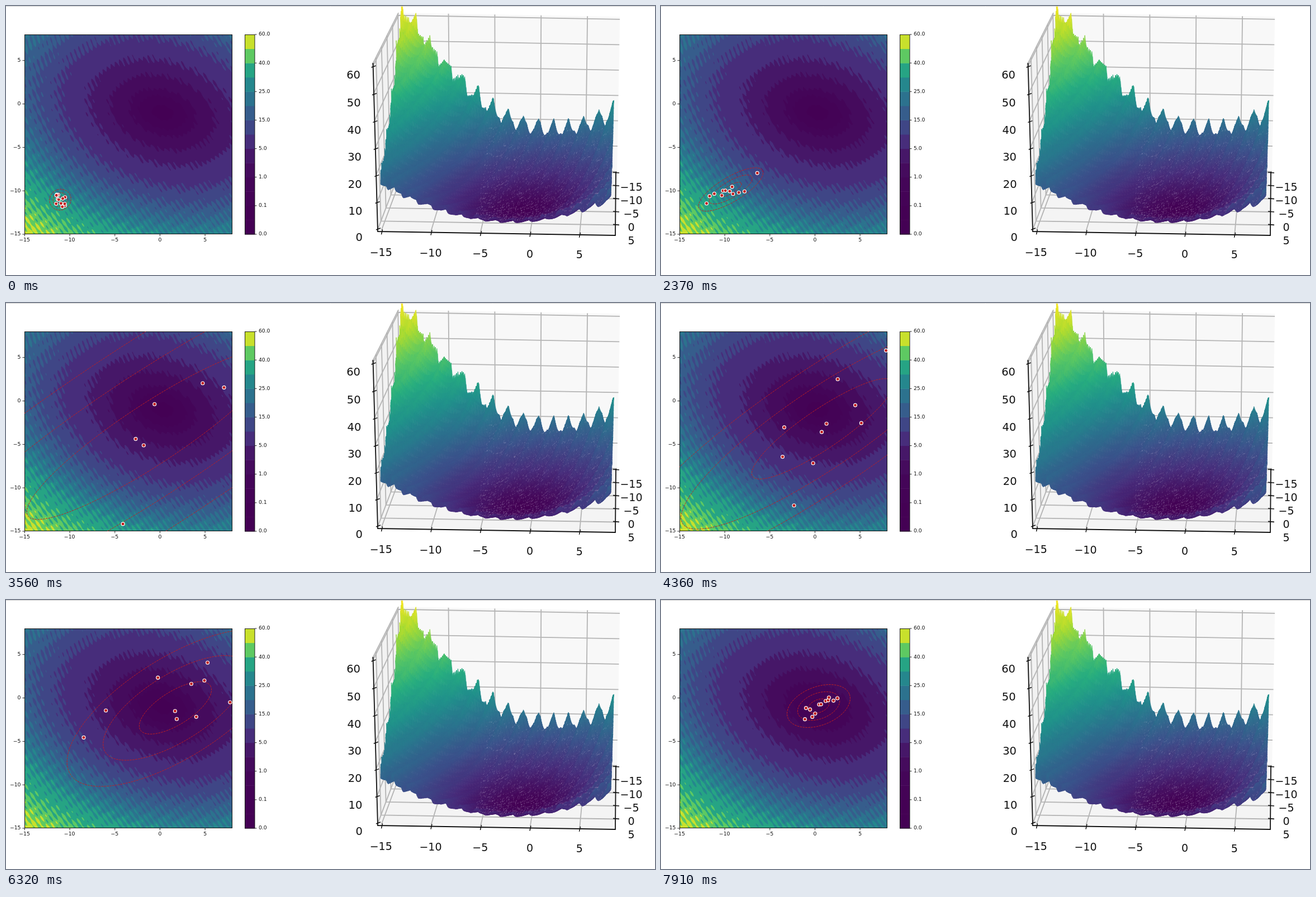
Recreate the animation shown at these times as an HTML page with a canvas. Size 1161 px wide and 482 px high, loop 8000 ms.

```html
<!DOCTYPE html>
<html>
<head>
<meta charset="utf-8">
<style>
html, body { margin: 0; width: 100%; height: 100%; overflow: hidden; background: #fff; }
canvas { display: block; }
</style>
</head>
<body>
<canvas id="stage" width="1161" height="482"></canvas>
<script>
const W = 1161, H = 482, TAU = Math.PI * 2, LOOP = 8000, STEP = 395.5;
const BOX = { x: 33, y: 51, w: 372, h: 358 };
const LEVELS = [0, .05, .1, .5, 1, 2.5, 5, 10, 15, 20, 25, 30, 40, 50, 60];
const FONT = 'px "DejaVu Sans", sans-serif';
const INK = '#111';

const VIRIDIS = ['440154', '472d7b', '3b528b', '2c728e', '21918c', '28ae80', '5ec962', 'addc30', 'fde725']
  .map(h => [0, 2, 4].map(i => parseInt(h.slice(i, i + 2), 16)));
const lerp = (a, b, t) => a + (b - a) * t;
const clamp = (v, lo, hi) => Math.max(lo, Math.min(hi, v));

function viridis(v) {
  const p = clamp(v, 0, 1) * 8, i = Math.min(7, Math.floor(p));
  return VIRIDIS[i].map((c, k) => lerp(c, VIRIDIS[i + 1][k], p - i));
}
const css = c => `rgb(${c.map(Math.round).join()})`;
const BANDS = LEVELS.slice(1).map((v, i) => viridis((v + LEVELS[i]) / 120));

function rng(seed) {
  return () => {
    seed = (seed + 0x6D2B79F5) | 0;
    let t = Math.imul(seed ^ (seed >>> 15), 1 | seed);
    t = (t + Math.imul(t ^ (t >>> 7), 61 | t)) ^ t;
    return ((t ^ (t >>> 14)) >>> 0) / 4294967296;
  };
}

// The plots never change, so they are drawn once
const base = document.createElement('canvas');
base.width = W;
base.height = H;
const g = base.getContext('2d');

function path(points) {
  g.beginPath();
  points.forEach(([x, y], i) => i ? g.lineTo(x, y) : g.moveTo(x, y));
}
function line(points, color, width) {
  path(points);
  g.strokeStyle = color;
  g.lineWidth = width;
  g.stroke();
}
function poly(points, color) {
  path(points);
  g.closePath();
  g.fillStyle = color;
  g.fill();
}
function label(text, x, y, size, align) {
  g.font = size + FONT;
  g.textAlign = align;
  g.textBaseline = 'middle';
  g.fillStyle = INK;
  g.fillText(String(text).replace('-', '\u2212'), x, y);
}

// Contour map
function height(px, py) {
  const dx = (px - 33) / 16.17 - 15.3, dy = 9 - (py - 51) / 15.565;
  const q = .08 * dx * dx + .14 * dy * dy + .05 * dx * dy;
  const rise = Math.max(0, 380 - py);
  const bend = .28 * (1 - (px - 33) / 372) * rise * rise / 560;
  const p1 = TAU * (px * .82 - py * .57 - bend) / 8.5;
  const p2 = TAU * (px * .57 + py * .82) / 21;
  return q * (1 + .11 * Math.cos(p1) + .06 * Math.cos(p2));
}
function band(v) {
  let i = 0;
  while (i < BANDS.length - 1 && v >= LEVELS[i + 1]) i++;
  return BANDS[i];
}
function drawMap() {
  const { x, y, w, h } = BOX;
  const img = g.createImageData(w, h);
  for (let j = 0, n = 0; j < h; j++) {
    for (let i = 0; i < w; i++, n += 4) {
      const sum = [0, 0, 0];
      for (let s = 0; s < 4; s++) {
        const c = band(height(x + i + .25 + .5 * (s & 1), y + j + .25 + .5 * (s >> 1)));
        c.forEach((v, k) => sum[k] += v / 4);
      }
      img.data.set([...sum, 255], n);
    }
  }
  g.putImageData(img, x, y);
  g.strokeStyle = INK;
  g.lineWidth = 1;
  g.strokeRect(x + .5, y + .5, w - 1, h - 1);
  for (let v = -15; v <= 5; v += 5) {
    const tx = x + .5 + (v + 15) * 16.13, ty = 409 - (v + 15) * 15.565;
    line([[tx, 409], [tx, 412.5]], INK, .9);
    line([[29.5, ty], [33, ty]], INK, .9);
    label(v, tx - (v < 0 ? .5 : 0), 420, 9.3, 'center');
    label(v, 26.5, ty, 9.3, 'right');
  }
}
function drawBar() {
  const step = BOX.h / BANDS.length;
  BANDS.forEach((c, i) => {
    g.fillStyle = css(c);
    g.fillRect(427, 409 - (i + 1) * step, 18, step + .5);
  });
  g.strokeStyle = INK;
  g.lineWidth = .9;
  g.strokeRect(427.5, 51.5, 17.5, 357.5);
  for (let i = 0; i < LEVELS.length; i += 2) {
    const y = 409 - i * step;
    line([[445, y], [448.5, y]], INK, .9);
    label(LEVELS[i].toFixed(1), 452, y, 9.2, 'left');
  }
}

// Perspective view of the surface
function project(x, y, z) {
  const t = (y + 15) / 23;
  return [
    lerp(955.5 + 16.18 * x, 938 + 17.7 * x, t) + z * lerp(.007, .013, t) * (x + 3.5),
    369 + 4.7 * y - .3 * (8.5 - x) - z * lerp(4.55, 4.85, t)
  ];
}
function surface(x, y) {
  const t = (y + 15) / 23, s = t - .65;
  const floor = s < 0 ? 17 * (s / .65) ** 2 : 4 * (s / .35) ** 2;
  const q = floor + (.165 - .073 * t ** 3) * (x - lerp(1.4, -2.4, t)) ** 2;
  const left = clamp((-4 - x) / 5, 0, 1);
  const cone = u => 1 - 1.8 * Math.abs(Math.sin(Math.PI * u));
  const broad = cone((x + .3 * (y + 15) - 3.1) / 1.65);
  const fine = cone((x + .7 * y) / .75);
  return q * (1 + lerp(.2, .08, left) * broad + lerp(.03, .11, left) * fine) + .25 * fine;
}
function drawPanes() {
  const x0 = -15.4, x1 = 8.5, y0 = -15.4, y1 = 8.4, top = 61;
  const grid = (...ps) => line(ps.map(p => project(...p)), '#b4b4b4', 1.8);
  const quad = (color, ...ps) => poly(ps.map(p => project(...p)), color);
  quad('#f4f4f4', [x0, y0, 0], [x1, y0, 0], [x1, y1, 0], [x0, y1, 0]);
  quad('#f2f2f2', [x0, y0, 0], [x0, y0, top], [x0, y1, top], [x0, y1, 0]);
  quad('#f8f8f8', [x0, y0, 0], [x0, y0, top], [x1, y0, top], [x1, y0, 0]);
  for (let v = -15; v <= 5; v += 5) {
    grid([v, y0, top], [v, y0, 0], [v, y1, 0]);
    grid([x0, v, top], [x0, v, 0], [x1, v, 0]);
  }
  for (let z = 0; z <= 60; z += 10) grid([x0, y1, z], [x0, y0, z], [x1, y0, z]);
  grid([x0, y1, top], [x0, y0, top]);
}
function drawAxes() {
  line([[656.5, 102], [665, 404], [1090, 411], [1091, 297]], INK, 1.8);
  for (let z = 0; z <= 60; z += 10) {
    const y = 400 - 4.85 * z + z * (60 - z) * .002, x = 665 - z * .14;
    line([[x - 3, y + 1], [x + 5, y - 2]], INK, 1.5);
    label(z, 638 - z / 15, y + 16, 19.5, 'right');
  }
  for (let v = -15; v <= 5; v += 5) {
    const x = 938 + 17.7 * v, y = 408.5 + v * .28;
    line([[x + 1, y - 4], [x - 1, y + 5]], INK, 1.5);
    label(v, 937 + 17.75 * v, 446 + v * .22, 19, 'center');
    const ry = 368.5 + 4.67 * v;
    line([[1086, ry - .5], [1097, ry + .5]], INK, 1.6);
    label(v, 1118.5, 398.5 + 4.8 * v, 19, 'center');
  }
}
function drawSurface() {
  const nx = 345, ny = 120, rand = rng(7);
  const row = j => Array.from({ length: nx + 1 }, (_, i) => {
    const x = -15 + 23 * i / nx, y = -15 + 23 * j / ny, z = surface(x, y);
    return [...project(x, y, z), z];
  });
  let back = row(0);
  for (let j = 1; j <= ny; j++) {
    const front = row(j);
    for (let i = 0; i < nx; i++) {
      const cell = [back[i], back[i + 1], front[i + 1], front[i]];
      const z = cell.reduce((s, p) => s + p[2], 0) / 4;
      const color = css(viridis((Math.max(0, z) / 62) ** .87));
      poly(cell, color);
      g.strokeStyle = color;
      g.lineWidth = .7;
      g.stroke();
      // Pale seams between the facets of the valley
      if (i > nx * .4 && z < 22 && rand() < .1) {
        const [x, y] = front[i];
        line([[x, y], [x + 1.2, y - 2.6]], 'rgba(205,195,220,.32)', .8);
      }
    }
    back = front;
  }
}

g.fillStyle = '#fff';
g.fillRect(0, 0, W, H);
drawMap();
drawBar();
drawPanes();
drawSurface();
drawAxes();
line([[0, .5], [W, .5]], '#cfcfcf', 1);

// Search distribution at key steps; axes are the three-sigma radii
const KEYS = [
  { at: 0, x: 97, y: 347, a: 19.5, b: 18.5, tilt: 31 },
  { at: 4, x: 116, y: 335, a: 47, b: 20, tilt: 31 },
  { at: 6, x: 133.5, y: 322.5, a: 93, b: 24, tilt: 31 },
  { at: 9, x: 260, y: 235, a: 795, b: 160, tilt: 33.5 },
  { at: 13, x: 318, y: 216, a: 259, b: 69, tilt: 35 },
  { at: 16, x: 295.5, y: 182, a: 206, b: 101, tilt: 31 },
  { at: 20, x: 282, y: 190, a: 59, b: 34.4, tilt: 21 }
];

// Centre and tilt move evenly, the radii grow and shrink geometrically
function spread(n) {
  const k = Math.max(1, KEYS.findIndex(s => s.at >= n));
  const p = KEYS[k - 1], q = KEYS[k], f = (n - p.at) / (q.at - p.at);
  const even = key => lerp(p[key], q[key], f);
  const ratio = key => p[key] * (q[key] / p[key]) ** f;
  return { x: even('x'), y: even('y'), a: ratio('a'), b: ratio('b'), tilt: -even('tilt') * TAU / 360 };
}

const ctx = document.getElementById('stage').getContext('2d');

function drawState(n) {
  const { x, y, a, b, tilt } = spread(n);
  ctx.save();
  ctx.beginPath();
  ctx.rect(BOX.x, BOX.y, BOX.w, BOX.h);
  ctx.clip();
  ctx.strokeStyle = '#c41f1f';
  ctx.lineWidth = 1;
  ctx.setLineDash([3.4, 1.5]);
  for (let k = 1; k <= 3; k++) {
    ctx.beginPath();
    ctx.ellipse(x, y, a * k / 3, b * k / 3, tilt, 0, TAU);
    ctx.stroke();
  }
  ctx.setLineDash([]);
  ctx.fillStyle = '#c01717';
  ctx.strokeStyle = '#fff';
  ctx.lineWidth = 1.1;
  const rand = rng(n * 31 + 5), c = Math.cos(tilt), s = Math.sin(tilt);
  for (let i = 0; i < 12; i++) {
    const r = Math.sqrt(-2 * Math.log(1 - rand())) / 3, p = TAU * rand();
    const u = a * r * Math.cos(p), v = b * r * Math.sin(p);
    ctx.beginPath();
    ctx.arc(x + u * c - v * s, y + u * s + v * c, 3, 0, TAU);
    ctx.fill();
    ctx.stroke();
  }
  ctx.restore();
}

function tick() {
  ctx.drawImage(base, 0, 0);
  drawState(Math.floor(performance.now() % LOOP / STEP));
  requestAnimationFrame(tick);
}
tick();
</script>
</body>
</html>
```
